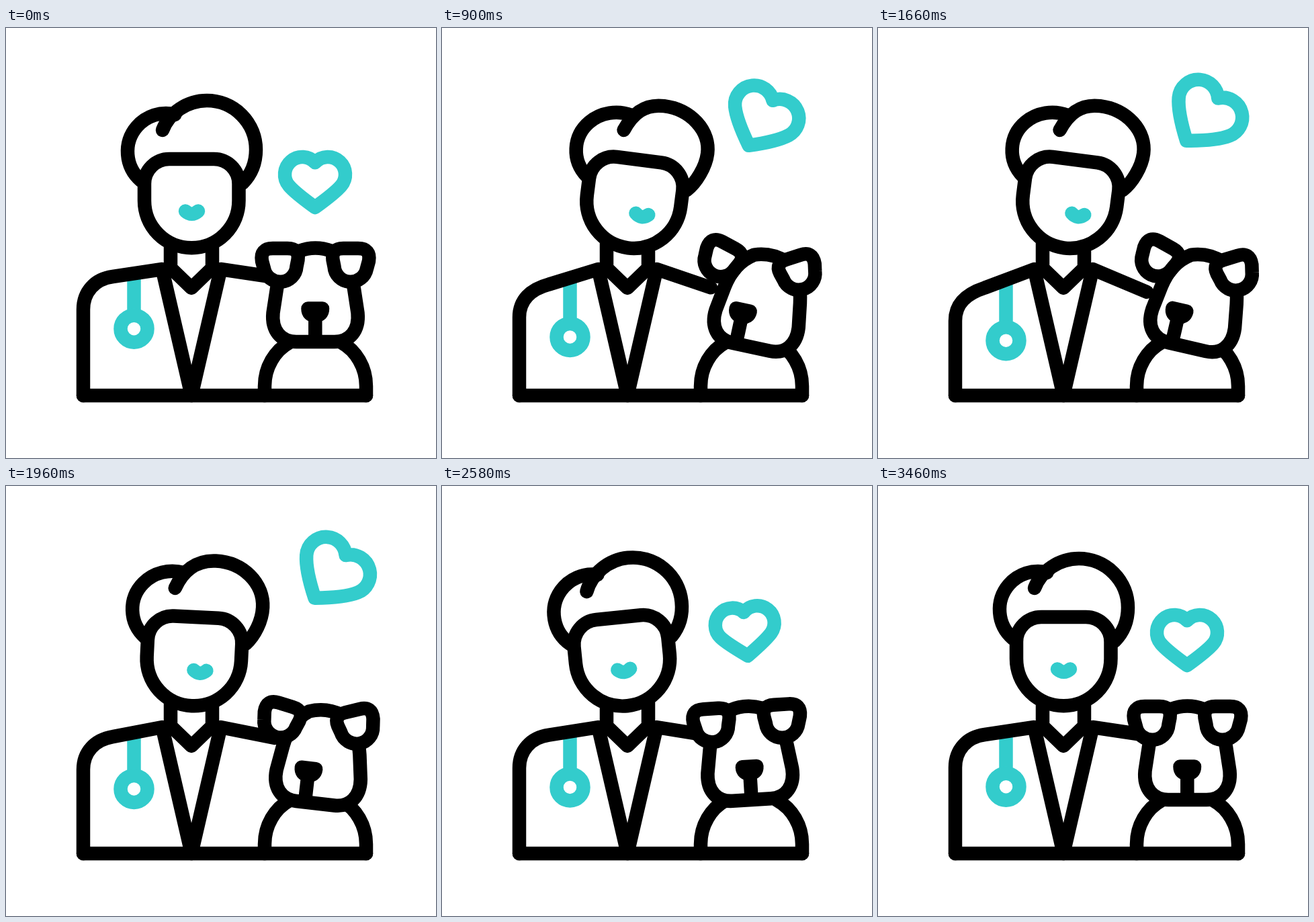
An HTML page with a canvas for the animation above (3600 ms loop, 640x640 px).

```html
<!DOCTYPE html>
<html lang="en">
<head>
<meta charset="utf-8">
<title>Vet and dog</title>
<style>
  html, body { margin: 0; width: 100%; height: 100%; overflow: hidden; background: #fff; }
  canvas { display: block; width: 100vmin; height: 100vmin; }
</style>
</head>
<body>
<canvas id="stage" width="640" height="640"></canvas>
<script>
const ctx = document.getElementById('stage').getContext('2d');
const LOOP = 3600, STEP = 20, REST = 3460;
const BACK = 1660, BACK_END = 2440; // the lean is held until BACK, then swings over
const BLACK = '#000', TEAL = '#33cccc', WHITE = '#fff';
const rad = deg => deg * Math.PI / 180;

const progress = (t, from, to) => Math.min(1, Math.max(0, (t - from) / (to - from)));
function smooth(t, from, to) {
  const u = progress(t, from, to);
  return u * u * (3 - 2 * u);
}
function smoother(t, from, to) {
  const u = progress(t, from, to);
  return u ** 3 * (10 - 15 * u + 6 * u * u);
}
const easeOut = (t, to) => Math.sin(Math.PI / 2 * progress(t, 0, to) ** 1.15);

// Damped swing from 1 to 0.
function settle(t, from) {
  const u = progress(t, from, REST);
  return Math.cos(2 * Math.PI * u) * (1 - u) ** 1.5;
}
// Goes out to peak, swings back past rest by overshoot, then settles.
function swing(t, out, peak, overshoot, backEnd) {
  return peak * (out - smooth(t, BACK, backEnd))
    - overshoot * (smooth(t, BACK, backEnd) + settle(t, backEnd) - 1);
}

const turn = t => smooth(t, 0, 840) - smooth(t, BACK, BACK_END);
const headTilt = t => 7.3 * smooth(t, 0, 740) - 13.6 * smooth(t, BACK, BACK_END)
  + 6.3 * smooth(t, BACK_END, 3220);
const dogTilt = t => swing(t, smooth(t, 0, 1060), 13, 6.8, BACK_END);
const breath = t => swing(t, easeOut(t, BACK), 17.5, 11, 2260);
const heartRise = t => 92 * smoother(t, 0, 800) + 10 * smooth(t, 800, 2100)
  - 102 * smooth(t, 1900, 2790);
const heartTilt = t => 36.7 * easeOut(t, 1500) - 44.7 * smooth(t, 1900, 2700)
  + 8 * smooth(t, 2700, REST);

function ink(path, color = BLACK, fill) {
  if (fill) {
    ctx.fillStyle = fill;
    ctx.fill(path);
  }
  ctx.strokeStyle = color;
  ctx.stroke(path);
}
const draw = (d, color, fill) => ink(new Path2D(d), color, fill);

function group(paint) {
  ctx.save();
  paint();
  ctx.restore();
}
function rotateAbout(x, y, deg) {
  ctx.translate(x, y);
  ctx.rotate(rad(deg));
  ctx.translate(-x, -y);
}

function drawBody(t) {
  const d = breath(t), s = 0.95 * d;
  group(() => {
    ctx.lineCap = 'butt';
    draw(`M190.5 ${366 + d / 2}V${427 + d}`, TEAL);
    draw('M245 320V357L276 387L307 357V320');
  });
  const ring = new Path2D();
  ring.arc(190.5, 447.7 + d, 20, 0, 2 * Math.PI);
  ink(ring, TEAL, WHITE);

  const shoulderY = 370 + s, slope = (shoulderY - 359) / 75;
  draw(`M115 547V${419 + s}C115 ${393 + s} 132 ${shoulderY + 24 * slope} 159 ${shoulderY}`
    + `L232.5 359L276 547L319.5 359L400 ${371 + 1.25 * d}`);
  draw('M115 547H536');
}

function drawHead(t) {
  const k = turn(t);
  rotateAbout(276, 330, headTilt(t));

  const lobe = new Path2D();
  lobe.ellipse(238 + 4 * k, 184 + 2 * k, 57 + 4 * k, 57, 0, 2.28, 2 * Math.PI - 1.33);
  ink(lobe);

  const cx = 299 + 4 * k, cy = 181 - 8 * k, rx = 73, ry = 73 - 11 * k;
  const tipX = 233 + 15 * k, tipY = 152 + 2 * k;
  const crown = new Path2D();
  crown.moveTo(tipX, tipY);
  crown.bezierCurveTo(tipX + 10, tipY - 26, cx - 29, cy - ry, cx, cy - ry);
  crown.ellipse(cx, cy, rx, ry, 0, -Math.PI / 2, 0);
  crown.bezierCurveTo(cx + rx, cy + 20, 365, 218, 352, 231);
  ink(crown);

  draw('M206 257V232A37 37 0 0 1 243 195H309.5A37 37 0 0 1 346.5 232V257A70.25 70.25 0 0 1 206 257Z', BLACK, WHITE);

  ctx.translate(14.4 * k, 2 * k);
  draw('M267 272.5Q276.5 281 286 272.5', TEAL);
}

function drawEar(x, y, deg, flip) {
  group(() => {
    ctx.translate(x, y);
    ctx.rotate(rad(deg));
    ctx.scale(flip, 1);
    ctx.translate(-408, -354);
    draw('M397 328H419Q437 328 434.5 345L432.5 355A24.5 24.5 0 0 1 384 358L381 347Q378 328 397 328Z', BLACK, WHITE);
  });
}

function drawDog(t) {
  const k = turn(t);
  draw('M385 547V533C385 505 400 480 422 468M499 468C521 480 536 505 536 533V547');

  ctx.translate(k, 8 * k);
  rotateAbout(461, 460, dogTilt(t));
  draw('M436 332Q460.5 323 485 332Q512 350 518 388L523.5 424C526 450 512 467 489 467H432C409 467 395 450 397.5 424L403 388Q409 350 436 332Z', BLACK, WHITE);

  group(() => {
    ctx.translate(-23 * k, -2 * k);
    draw('M449.5 417.5H471Q471 428 460.3 428Q449.5 428 449.5 417.5Z', BLACK, BLACK);
    draw('M460.3 428V462');
  });
  drawEar(408 - 19 * k, 354 - 3 * k, 16 * k, 1);
  drawEar(513 - 6 * k, 354 - 8.5 * k, -30 * k, -1);
}

function drawHeart(t) {
  const tilt = heartTilt(t), rise = heartRise(t), m = tilt / 36.7;
  const spread = 19 + 3.5 * m, r = 26 + 3.3 * m, cy = -49 - 11 * m;
  const low = rad(140 + 8 * m), dip = Math.acos(spread / r), bend = 14 + 8 * m;
  const px = spread - r * Math.cos(low), py = cy + r * Math.sin(low);
  const bendX = px + bend * -Math.sin(low), bendY = py - bend * Math.cos(low);

  ctx.translate(460 - 11.5 * Math.sin(Math.PI * rise / 102), 267 - rise);
  ctx.rotate(rad(tilt));
  const heart = new Path2D();
  heart.moveTo(0, 0);
  heart.quadraticCurveTo(-bendX, bendY, -px, py);
  heart.arc(-spread, cy, r, low, 2 * Math.PI - dip);
  heart.arc(spread, cy, r, Math.PI + dip, 3 * Math.PI - low);
  heart.quadraticCurveTo(bendX, bendY, 0, 0);
  heart.closePath();
  ink(heart, TEAL);
}

function render(now) {
  const t = Math.floor(now % LOOP / STEP) * STEP;
  ctx.fillStyle = WHITE;
  ctx.fillRect(0, 0, 640, 640);
  ctx.lineWidth = 20.5;
  ctx.lineJoin = ctx.lineCap = 'round';
  for (const part of [drawBody, drawHead, drawDog, drawHeart]) group(() => part(t));
}

let start;
function tick(now) {
  start ??= now;
  render(now - start);
  requestAnimationFrame(tick);
}
render(0);
requestAnimationFrame(tick);
</script>
</body>
</html>
```
